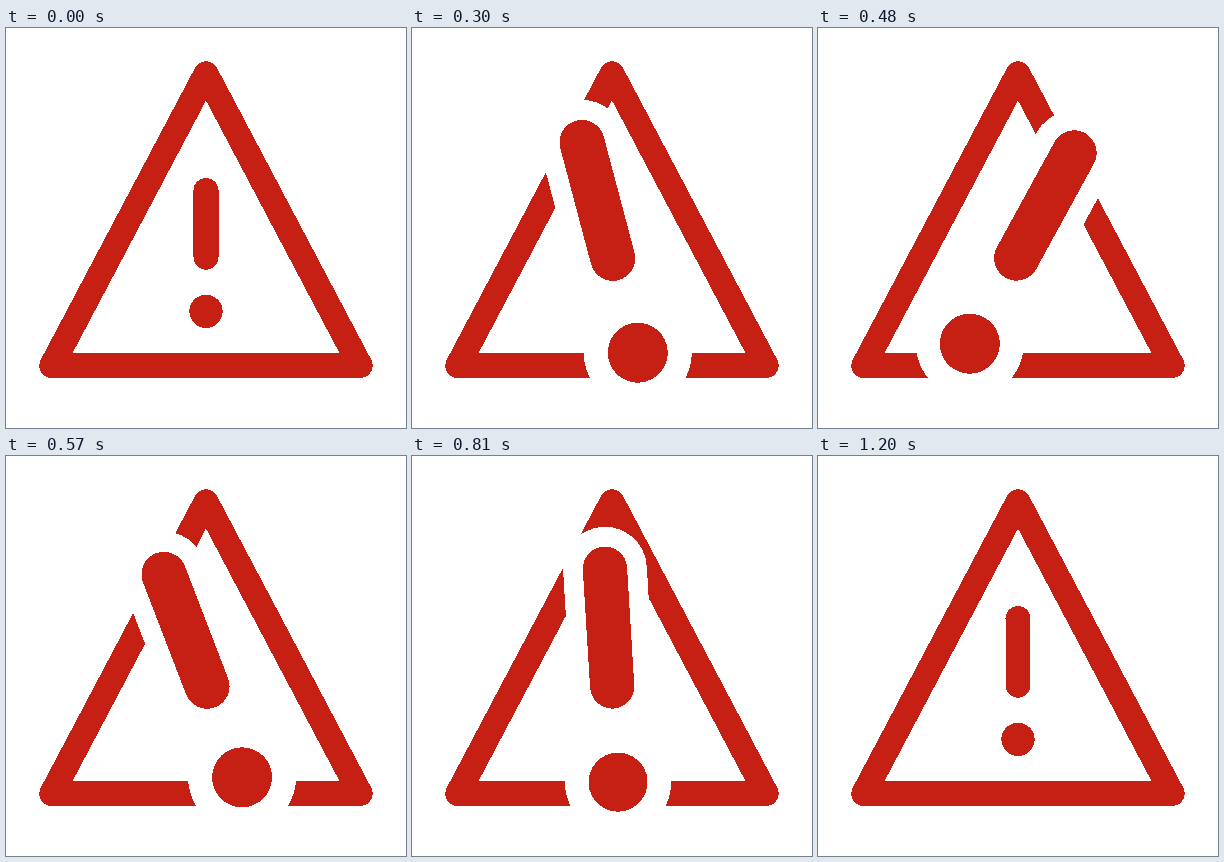
Write an HTML page without scripts that moves like this. It is 400 px wide and 400 px high and loops after 4230 ms.

```html
<!DOCTYPE html>
<html lang="en">
<head>
<meta charset="utf-8">
<title>Warning sign</title>
<style>
  html, body { margin: 0; width: 100%; height: 100%; overflow: hidden; background: #fff; }
  svg { display: block; width: 100%; height: 100%; shape-rendering: crispEdges; }

  .sign, .bar { fill: none; stroke: #c62015; stroke-width: 1.5; stroke-linecap: round; stroke-linejoin: round; }
  .dot { fill: #c62015; }

  /* white gap that cuts the mark out of the triangle */
  .halo .bar { stroke: #fff; stroke-width: 2.84; }
  .halo .dot { fill: #fff; }

  .mark {
    transform-origin: 12px 13.65px;
    animation: 4230ms cubic-bezier(.37, 0, .63, 1) infinite;
    animation-name: grow, shake;
  }
  @keyframes grow {
    0%, 26%, 100% { scale: 1; }
    7.09%, 18.2% { scale: 1.8; }
  }
  @keyframes shake {
    0%, 5.74% { rotate: 0deg; }
    8.51% { rotate: -30deg; }
    11.06% { rotate: 30deg; }
    14.33% { rotate: -30deg; }
    20.57%, 100% { rotate: 0deg; }
  }
</style>
</head>
<body>
<svg viewBox="0 0 24 24">
  <path class="sign" d="M12 2.75 21.25 20.25H2.75Z"/>
  <g class="mark">
    <g class="halo">
      <path class="bar" d="M12 9.75v4"/>
      <circle class="dot" cx="12" cy="17" r="1.8"/>
    </g>
    <path class="bar" d="M12 9.75v4"/>
    <circle class="dot" cx="12" cy="17" r="1"/>
  </g>
</svg>
</body>
</html>
```
